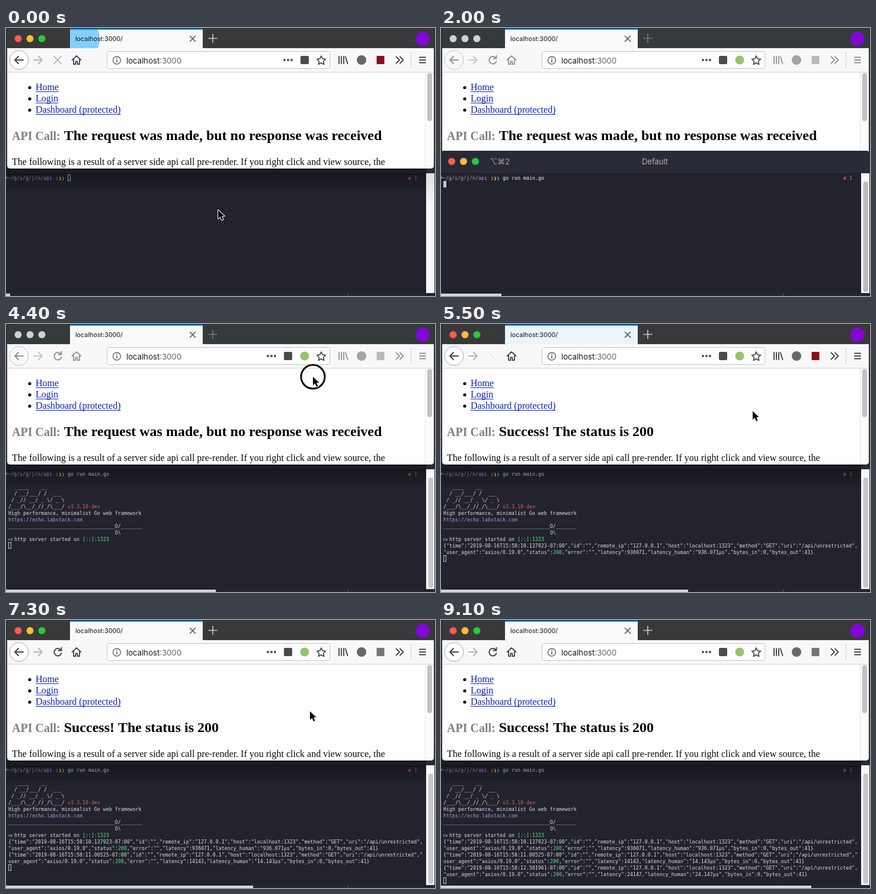
Animation, 724 px wide and 452 px high, one loop 9.2 s. Source, as an HTML page with a canvas:

```html
<!DOCTYPE html>
<html lang="en">
<head>
<meta charset="utf-8">
<title>API demo</title>
<style>
html, body { margin: 0; width: 100%; height: 100%; overflow: hidden; background: #303132; }
canvas { display: block; width: 724px; height: 452px; }
</style>
</head>
<body>
<canvas id="stage" width="724" height="452"></canvas>
<script>
const g = document.getElementById('stage').getContext('2d');
const LOOP = 9200, STEP = 100, TAU = Math.PI * 2;
const SANS = 'Inter, "DejaVu Sans", sans-serif';
const SERIF = '"Liberation Serif", serif';
const MONO = '8.305px "DejaVu Sans Mono", monospace';
const COL = 5, ROW = 11, COLS = 140;

const TERM_FRONT = 500, BROWSER_FRONT = 4400, BROWSER_FOCUS = 4500;
const TYPE_FROM = 900, ENTER = 1900, SERVER_UP = 2800;
const BURSTS = [-100, 5150, 6000, 7500];
const COMMAND = 'go run main.go';

const BANNER = [
  '   ____    __',
  '  / __/___/ /  ___',
  ' / _// __/ _ \\/ _ \\',
  '/___/\\__/_//_/\\___/'
];
const LOGS = [
  [5200, '10.137923', '936071', '936.071'],
  [6050, '11.00525', '14143', '14.143'],
  [7550, '12.501961', '24147', '24.147']
];

// [time, x, y] of the pointer tip
const POINTER = [[0, 358, 307], [3000, 358, 307], [3400, 380, 270], [4200, 518, 89],
  [4600, 518, 89], [5500, 526, 147], [6100, 576, 183], [6600, 560, 178],
  [7300, 513, 154], [8100, 513, 154], [8800, 480, 470], [9200, 480, 470]];
const BAR = [[0, 7], [2000, 102], [4400, 354], [5500, 417], [8100, 417], [9000, 625], [9200, 625]];

function track(keys, t, k = 1) {
  for (let i = 1; i < keys.length; i++) {
    const a = keys[i - 1], b = keys[i];
    if (t <= b[0]) return a[k] + (b[k] - a[k]) * (t - a[0]) / (b[0] - a[0]);
  }
  return keys[keys.length - 1][k];
}

function rect(x, y, w, h, color) {
  g.fillStyle = color;
  g.fillRect(x, y, w, h);
}

function round(x, y, w, h, r, fill, stroke) {
  g.beginPath();
  g.roundRect(x, y, w, h, r);
  if (fill) { g.fillStyle = fill; g.fill(); }
  if (stroke) { g.strokeStyle = stroke; g.lineWidth = 1; g.stroke(); }
}

function disc(x, y, r, color) {
  g.beginPath();
  g.arc(x, y, r, 0, TAU);
  g.fillStyle = color;
  g.fill();
}

function ring(x, y, r, color, width) {
  g.beginPath();
  g.arc(x, y, r, 0, TAU);
  g.strokeStyle = color;
  g.lineWidth = width;
  g.stroke();
}

function path(d, color, width = 2, x = 0, y = 0) {
  g.save();
  g.translate(x, y);
  g.strokeStyle = color;
  g.lineWidth = width;
  g.lineCap = g.lineJoin = 'round';
  g.stroke(new Path2D(d));
  g.restore();
}

function text(s, x, y, font, color, align = 'left') {
  g.font = font;
  g.fillStyle = color;
  g.textAlign = align;
  g.fillText(s, x, y);
  return g.measureText(s).width;
}

function lights(x, y, on) {
  ['#fc5b53', '#fdbc2e', '#29c840'].forEach((c, i) => disc(x + i * 20, y, 6, on ? c : '#cfd2d4'));
}

function drawTabs(active, age) {
  round(2, 1, 720, 36, [5, 5, 0, 0], active ? '#39393b' : '#353a3c');
  lights(20.5, 18, active);
  rect(108, 1, 224, 33, '#f9f9fa');
  if (age < 500) {
    g.save();
    g.beginPath();
    g.rect(108, 1, 224, 33);
    g.clip();
    g.globalAlpha = age <= 100 ? 1 : Math.max(0, 1 - (age - 100) / 290);
    disc(116, 18, 42 * Math.pow(age / 100, 1.5), '#84d0fb');
    g.restore();
  }
  rect(108, 1, 224, 2, '#1585ee');
  text('localhost:3000/', 117, 22, '10.8px ' + SANS, '#141416');
  path('M310.5 13.5l9 9M319.5 13.5l-9 9', '#55565a', 1.6);
  path('M342 17.5h14M349 10.5v14', active ? '#c8c9cb' : '#75797b', 1.7);
  disc(703, 18, 12, '#8207d4');
}

function drawToolbar(active, age) {
  const ink = active ? '#45464a' : '#92949a';
  const pale = active ? '#b5b6ba' : '#c6c8cb';
  const loaded = age >= 200;
  rect(2, 34, 720, 40, '#f8f8f9');
  rect(2, 74, 720, 1, '#cfcfd2');

  disc(22, 54, 16, active ? '#ffffff' : '#f8f8f9');
  ring(22, 54, 16, active ? '#a8a9ad' : '#c4c5c8', 1);
  path('M29 54H15M21 48l-6 6 6 6', ink, 2);
  path('M47 54h14M55 48l6 6-6 6', pale, 2);
  if (age < 300) path('M81 48l12 12M93 48l-12 12', '#babbbf', 1.8);
  else if (age < 450) path('M81 48l10 11', '#d5d6d9', 1);
  else path('M92 50a6.2 6.2 0 1 0 1.5 6M93.5 46.5v5h-5', ink, 2);
  path('M111.5 54l7.5-7 7.5 7M114 53v8h3.5v-4.5h3V61h3.5v-8', ink, 1.8);

  round(170.5, 39.5, 376, 29, 3, '#ffffff', '#c5c5c9');
  ring(187, 54.5, 6.5, '#606166', 1.4);
  rect(186.2, 53.5, 1.7, 4.5, '#606166');
  rect(186.2, 50.5, 1.7, 1.8, '#606166');
  const w = text('localhost', 203, 59.5, '13.2px ' + SANS, '#17171a');
  text(':3000', 203 + w, 59.5, '13.2px ' + SANS, '#606166');

  const shift = loaded ? 0 : 28;
  for (let i = 0; i < 3; i++) disc(442 + i * 6 + shift, 54, 2, '#4a4b4f');
  round(469 + shift, 47, 14, 14, 2, '#4a4b4f');
  if (loaded) disc(504, 54, 7.5, '#92c569');
  path('M0-7.5l2.2 4.9 5.3.6-3.9 3.6 1 5.3L0 4.3l-4.6 2.6 1-5.3-3.9-3.6 5.3-.6z', '#46474b', 1.7, 532, 54.5);

  path('M562 48v12M566 48v12M570 48v12M573 48.5l3.5 11.5', ink, 1.9);
  disc(600, 54, 8, active ? '#66676c' : '#a2a4a9');
  round(625.5, 47, 13, 14, 1, !active ? '#b9babd' : age < 900 ? '#8b1118' : '#777477');
  path('M658.5 48.5l5.5 5.5-5.5 5.5M665 48.5l5.5 5.5-5.5 5.5', ink, 1.8);
  rect(683, 41, 1, 27, '#d6d6d9');
  path('M698 49.5h10M698 54h10M698 58.5h10', ink, 1.8);
}

function drawPage(ok) {
  rect(2, 75, 720, 162, '#ffffff');
  ['Home', 'Login', 'Dashboard (protected)'].forEach((s, i) => {
    const y = 105 + i * 19;
    disc(40, y - 4.5, 2.6, '#000');
    const w = text(s, 50, y, '16px ' + SERIF, '#0a22b8');
    rect(50, y + 2, w, 1, '#0a22b8');
  });
  const w = text('API Call:', 10, 189, 'bold 20px ' + SERIF, '#808083');
  text(ok ? 'Success! The status is 200' : 'The request was made, but no response was received',
    16 + w, 189, 'bold 24px ' + SERIF, '#000');
  text('The following is a result of a server side api call pre-render. If you right click and view source, the',
    10, 231, '16px ' + SERIF, '#0a0a0a');
  rect(707, 75, 15, 162, '#fafafa');
  rect(707, 75, 1, 162, '#e4e4e5');
  round(711, 76, 8, 81, 4, '#c1c1c3');
}

function drawBrowser(t, active) {
  const start = BURSTS.filter(b => b <= t).pop();
  const age = t - start;
  g.save();
  g.beginPath();
  g.roundRect(2, 1, 720, 236, 5);
  g.clip();
  drawTabs(active, age);
  drawToolbar(active, age);
  drawPage(t >= 5200);
  g.restore();
}

// Prints [text, colour] runs on one terminal row.
function print(row, col, ...runs) {
  for (const [s, color] of runs) {
    text(s, 4 + col * COL, 256 + row * ROW, MONO, color);
    col += s.length;
  }
}

function logText([, time, latency, human]) {
  return `{"time":"2019-08-16T15:58:${time}-07:00","id":"","remote_ip":"127.0.0.1",` +
    '"host":"localhost:1323","method":"GET","uri":"/api/unrestricted",' +
    `"user_agent":"axios/0.19.0","status":200,"error":"","latency":${latency},` +
    `"latency_human":"${human}µs","bytes_in":0,"bytes_out":41}`;
}

function drawTerminal(t, focus) {
  const white = focus ? '#f2f2f0' : '#dcdcdd';
  const red = focus ? '#ff5c57' : '#d9605c';
  const green = '#5be487', purple = '#b294dc';
  round(0, 207, 723, 240, 5, '#22232d');
  round(0, 207, 723, 38, [5, 5, 0, 0], '#282a35');
  rect(0, 245, 709, 1, '#1b1c24');
  lights(18, 225, true);
  text('⌥⌘2', 82, 230, '13px ' + SANS, '#a4a5aa');
  text('Default', 361, 230, '13px ' + SANS, '#b6b7bb', 'center');

  rect(709, 245, 14, 202, '#f7f7f8');
  if (t >= TERM_FRONT) round(712.5, 259, 8.5, 186, 4, focus ? '#bcbcbf' : '#c7c7ca');
  else {
    const fade = g.createLinearGradient(0, 245, 0, 300);
    fade.addColorStop(0, '#dededf');
    fade.addColorStop(1, '#f7f7f8');
    rect(709, 245, 14, 55, fade);
  }

  g.fillStyle = '#4a90d9';
  g.fill(new Path2D('M0 249.5l3 3-3 3z'));
  print(0, -0.2, ['~/g/s/g/j/n/', '#a79fb6'], ['api', '#bd93ec']);
  print(0, 16, ['❯', red], ['❯', '#f0ec9a'], ['❯', green]);
  print(0, 135, ['✘ 1', red]);
  const typed = t < TYPE_FROM ? 0 : Math.min(COMMAND.length, Math.floor((t - TYPE_FROM) / 70) + 1);
  print(0, 20, [COMMAND.slice(0, typed), white]);

  let row = 0, col = 20 + typed;
  if (t >= ENTER) { row = 1; col = 0; }
  if (t >= SERVER_UP) {
    BANNER.forEach((s, i) => print(2 + i, 0, [s, white]));
    print(5, 20, ['v3.3.10-dev', red]);
    print(6, 0, ['High performance, minimalist Go web framework', white]);
    print(7, 0, ['https://echo.labstack.com', purple]);
    print(8, 0, ['_'.repeat(36) + 'O/' + '_'.repeat(7), white]);
    print(9, 36, ['O\\', white]);
    text('⇨', 3.5, 366.5, '10px "DejaVu Sans", sans-serif', white);
    print(10, 2, ['http server started on ', white], ['[::]:1323', green]);
    row = 11;
    for (const log of LOGS) {
      if (t < log[0]) break;
      const s = logText(log), tail = s.slice(COLS), at = tail.indexOf(':200') + 1;
      print(row, 0, [s.slice(0, COLS), white]);
      print(row + 1, 0, [tail.slice(0, at), white], ['200', green], [tail.slice(at + 3), white]);
      row += 2;
    }
  }
  const x = 4 + col * COL, y = 247 + row * ROW;
  if (focus) rect(x, y, 5, 11, '#c4c5c9');
  else {
    g.strokeStyle = '#c4c5c9';
    g.lineWidth = 1;
    g.strokeRect(x + 0.5, y + 0.5, 4, 10);
  }
}

function shadow() {
  const s = g.createLinearGradient(0, 237, 0, 280);
  s.addColorStop(0, 'rgba(0,0,0,.4)');
  s.addColorStop(1, 'rgba(0,0,0,0)');
  rect(0, 237, 709, 43, s);
}

function drawPointer(t) {
  if (t >= 700 && t < 3000) return;
  const x = track(POINTER, t, 1), y = track(POINTER, t, 2);
  if ((t >= 300 && t < 500) || (t >= 4300 && t < 4500)) ring(x, y, 20, '#08080a', 3);
  const arrow = new Path2D('M0 0v14.5l3.4-3.2 2.6 5.7 2.6-1.2-2.6-5.5h4.7z');
  g.save();
  g.translate(x, y);
  g.lineJoin = 'round';
  g.lineWidth = 2;
  g.strokeStyle = '#fff';
  g.stroke(arrow);
  g.fillStyle = '#0a0a0a';
  g.fill(arrow);
  g.restore();
}

function draw(t) {
  rect(0, 0, 724, 452, '#303132');
  rect(0, 447, 724, 5, '#252629');
  rect(577, 447, 1, 5, '#55565a');
  rect(0, 448, track(BAR, t), 4, '#d6d6d7');
  if (t >= TERM_FRONT && t < BROWSER_FRONT) {
    drawBrowser(t, false);
    drawTerminal(t, true);
  } else {
    drawTerminal(t, false);
    shadow();
    drawBrowser(t, t < TERM_FRONT || t >= BROWSER_FOCUS);
  }
  drawPointer(t);
}

const began = performance.now();
function tick() {
  const t = (performance.now() - began) % LOOP;
  draw(Math.floor(t / STEP) * STEP);
  requestAnimationFrame(tick);
}
tick();
</script>
</body>
</html>
```
